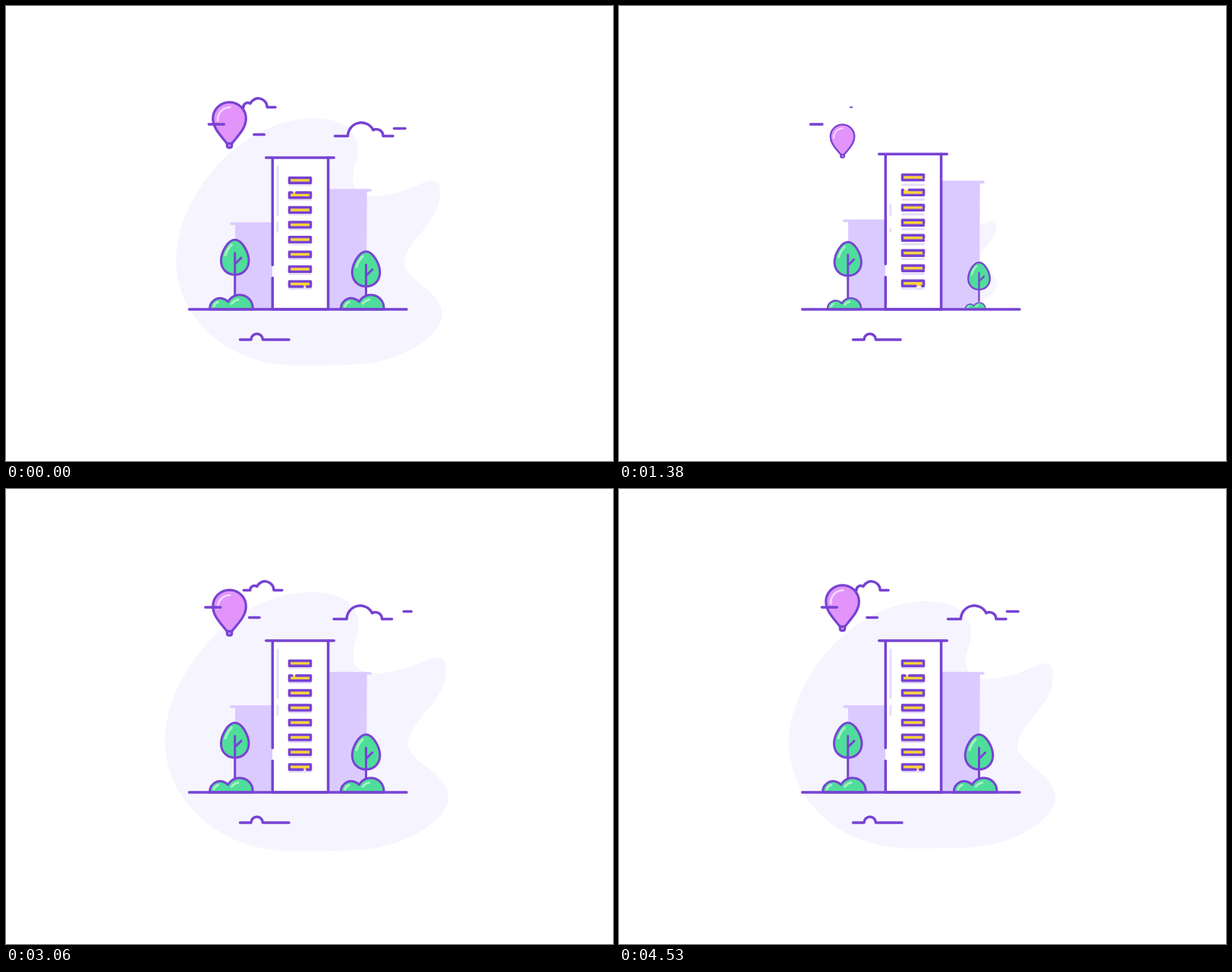
These frames come from a looping animation (800x600 px, 4560 ms). An HTML page:

```html
<!DOCTYPE html>
<html lang="en">
<head>
<meta charset="utf-8">
<title>City block</title>
<style>
  html, body { margin: 0; width: 100%; height: 100%; overflow: hidden; background: #fff; }
  svg { display: block; width: 100vw; height: 100vh; }
  path { fill: none; stroke: #7743d3; stroke-width: 3.5; stroke-linecap: round; stroke-linejoin: round; }
  #blob { fill: #f6f4fe; stroke: none; }
  .back path { fill: #dbcaff; stroke: none; }
  .back .roof { stroke: #dbcaff; }
  .face { fill: #fff; stroke: none; }
  .pale { stroke: #e6dcfb; }
  .glass { fill: #fdd43b; stroke: none; }
  .plant path { stroke-width: 3; }
  .plant .leaf { fill: #4fdd9b; }
  .plant .shine { stroke: #a6f3bd; }
  .balloon path { fill: #e294fa; stroke-width: 3.2; }
  .balloon .shine { fill: none; stroke: #f6d6ff; stroke-width: 2.6; }
</style>
</head>
<body>
<svg viewBox="0 0 800 600">
  <path id="blob" d="M405 148C450 148 464 170 464 190C464 208 454 214 458 234C461 250 480 253 500 249
    C540 242 548 230 563 230C573 231 573 245 571 258C565 288 525 315 525 339C525 362 575 375 575 407
    C575 432 525 473 450 473C415 474 410 474 385 474C280 474 224 400 224 336C224 250 310 148 405 148Z"/>
  <g class="back">
    <g id="leftBlock"><path d="M302 287H352V400H302Z"/><path class="roof" d="M297 287H351"/></g>
    <g id="rightBlock"><path d="M424 243H475.7L475 400H424Z"/><path class="roof" d="M426 243H480"/></g>
  </g>
  <g id="tower">
    <path class="face" d="M351 200H425V400H351Z"/>
    <path d="M351.3 200V341.5M351.3 358.5V400M342.7 200H432.3"/>
    <path id="wall" d="M424.6 200V400"/>
    <path id="base" d="M351.3 400H424.6"/>
  </g>
  <path id="gleamTop" class="pale" d="M358 275.5V212"/>
  <path id="gleamLow" class="pale" d="M358 297.5V286"/>
  <g id="shades"></g>
  <g id="windows"></g>
  <g id="plants"></g>
  <path id="ground" d="M241.5 400H528"/>
  <path id="pond" d="M308.5 440H323A7.7 7.7 0 0 1 338.4 440H373"/>
  <path id="cloudL" d="M304.5 133.5H313A5.6 5.6 0 0 1 321.9 128.6A11.7 11.7 0 0 1 344.2 133.5H355"/>
  <path id="cloudR" d="M433.5 171.5H450.5A17.7 17.7 0 0 1 484 163.6A8.8 8.8 0 0 1 497 171.5H510"/>
  <g class="balloon" id="balloon">
    <path d="M-3.2 24H3.2V27Q3.2 29.6 0 29.6Q-3.2 29.6 -3.2 27Z"/>
    <path d="M0 -30.5A21.8 21.8 0 0 1 21.8 -8.7C21.8 4 11 14 3.2 24H-3.2C-11 14 -21.8 4 -21.8 -8.7A21.8 21.8 0 0 1 0 -30.5Z"/>
    <path class="shine" d="M-15.5 -6C-16 -16 -9 -23.5 1 -23.8"/>
  </g>
  <path id="dashA" d="M0 156H20"/>
  <path id="dashB" d="M0 169.5H13.5"/>
  <path id="dashC" d="M0 161.5H-14.5"/>
</svg>
<script>
const LOOP = 4560, STEP = 30;
const $ = id => document.getElementById(id);

// Easing between times a and b, from 0 to 1.
const linear = (t, a, b) => Math.min(1, Math.max(0, (t - a) / (b - a)));
const out = (t, a, b) => 1 - (1 - linear(t, a, b)) ** 3;
const inOut = (t, a, b) => (1 - Math.cos(Math.PI * linear(t, a, b))) / 2;
// 0 to 1 and back to 0.
const swing = (t, a, b) => (1 - Math.cos(2 * Math.PI * linear(t, a, b))) / 2;
// Grows past full size until b, then settles at 1 by c.
const pop = (t, a, b, c, peak) => out(t, a, b) * peak - (peak - 1) * inOut(t, b, c);

// Reveals a path from its start; young lines are thinner.
function trim(el, p, width = 3.5) {
  el.style.visibility = p > 0 ? "visible" : "hidden";
  el.setAttribute("pathLength", 1);
  el.style.strokeDasharray = p >= 1 ? "none" : `${p} 2`;
  el.style.strokeWidth = width * Math.min(1, 0.4 + 4 * p);
}

const about = (x, y, sx, sy = sx) => `translate(${x} ${y}) scale(${sx} ${sy}) translate(${-x} ${-y})`;

function place(id, transform) {
  $(id).setAttribute("transform", transform);
}
const move = (id, x) => place(id, `translate(${x} 0)`);
const stretch = (id, s) => place(id, about(0, 400, 1, s));

// Windows: the second and the last one stay slightly open.
const L = 373.4, R = 401.6;
for (let i = 0; i < 8; i++) {
  const y = 229.9 + 19.52 * i, a = y - 3.4, b = y + 3.4;
  const d = i === 1 ? `M382.5 ${a}H${R}V${b}H${L}V${a}H377`
    : i === 7 ? `M391 ${b}H${L}V${a}H${R}V${b}H396.5`
    : `M${R} ${b}H${L}V${a}H${R}V${b}`;
  $("windows").innerHTML += `<path class="glass" d="M${L} ${a}H${R}V${b}H${L}Z"/><path class="win" d="${d}"/>`;
  $("shades").innerHTML += `<path class="pale" d="M401.5 ${y + 6}H373.5"/>`;
}

function tree(id, x, y, foot) {
  return `<g class="plant" id="${id}"><g transform="translate(${x} ${y})">
    <path class="leaf" d="M0 -23C9.5 -23 18.3 -6 18.3 4.5C18.3 15.5 10.5 23 0 23C-10.5 23 -18.3 15.5 -18.3 4.5C-18.3 -6 -9.5 -23 0 -23Z"/>
    <path d="M0 -5.5V${foot - y}M0 9L8.3 0.8"/>
    <path class="shine" d="M-12.6 -2.5Q-9.8 -11.5 -4.3 -16.5"/></g></g>`;
}
function bush(id, x) {
  return `<g class="plant" id="${id}"><g transform="translate(${x} 400)">
    <path class="leaf" d="M-28.5 0A13.8 13.5 0 0 1 -4.3 -10A17.2 16.8 0 0 1 28 0Z"/>
    <path class="shine" d="M-23 -4Q-21.5 -8.5 -17.5 -9.5M0.5 -7.5Q3.5 -12 9 -12.8"/></g></g>`;
}
$("plants").innerHTML = tree("treeL", 301.7, 331.3, 394) + tree("treeR", 474.5, 346.7, 389)
  + bush("bushL", 297) + bush("bushR", 469.8);

const wins = document.querySelectorAll(".win");
const glass = document.querySelectorAll(".glass");
const shades = document.querySelectorAll("#shades path");

function draw(t) {
  // The backdrop swells once, after growing and catching up to the lower right.
  const swell = swing(t, 1900, 4000);
  place("blob", about(450, 400, 1 + 0.066 * swell, 1 + 0.05 * swell)
    + about(432, 336, inOut(t, 960, 1800))
    + about(390, 230, 0.945 + 0.055 * inOut(t, 1860, 2600)));

  const rise = pop(t, 420, 1300, 1800, 1.025);
  stretch("leftBlock", pop(t, 300, 1170, 1800, 1.045));
  stretch("rightBlock", pop(t, 680, 1340, 1860, 1.07));
  stretch("tower", rise);
  stretch("windows", rise);
  $("tower").style.visibility = rise > 0 ? "visible" : "hidden";
  trim($("wall"), rise && inOut(t, 760, 1170));
  trim($("base"), rise && out(t, 560, 1350));

  wins.forEach(w => trim(w, inOut(t, 837, 1465), 3.4));
  glass.forEach(g => g.style.opacity = linear(t, 1020, 1250));
  shades.forEach(s => trim(s, linear(t, 950, 1350), 2.8));
  trim($("gleamTop"), inOut(t, 1090, 2045), 2.8);
  trim($("gleamLow"), inOut(t, 1090, 1900), 2.8);

  place("treeL", about(301.7, 396, pop(t, 904, 1702, 2150, 1.035)));
  place("treeR", about(474.5, 389, pop(t, 928, 2170, 2600, 1.05)));
  place("bushL", about(297, 400, pop(t, 1100, 1870, 2300, 1.05)));
  place("bushR", about(469.8, 400, pop(t, 1230, 2090, 2500, 1.07)));

  trim($("ground"), out(t, 200, 1370));
  trim($("pond"), out(t, 774, 1630));

  trim($("cloudL"), inOut(t, 1237, 2356));
  move("cloudL", 12.5 * swing(t, 1250, 3900));
  trim($("cloudR"), inOut(t, 1700, 2800));
  move("cloudR", -5.5 * (1 - inOut(t, 1860, 2500)) - 7 * swing(t, 2800, 4530));

  trim($("dashA"), inOut(t, 940, 1580));
  move("dashA", 250.7 + 16.6 * linear(t, 1110, 3800));
  trim($("dashB"), inOut(t, 1740, 2350));
  move("dashB", 315.5 + 11.3 * linear(t, 1860, 4530));
  trim($("dashC"), inOut(t, 2720, 3270));
  move("dashC", 536.5 - 10.5 * inOut(t, 2720, 3800));

  const y = 190.3 - 33 * inOut(t, 850, 2150) + 6.3 * swing(t, 2100, 4100);
  place("balloon", `translate(294.5 ${y}) scale(${out(t, 835, 2395)})`);
}

const start = performance.now();
function tick() {
  const t = Math.floor((performance.now() - start) % LOOP / STEP) * STEP;
  draw(t || LOOP); // the loop opens on the finished picture
  requestAnimationFrame(tick);
}
tick();
</script>
</body>
</html>
```
